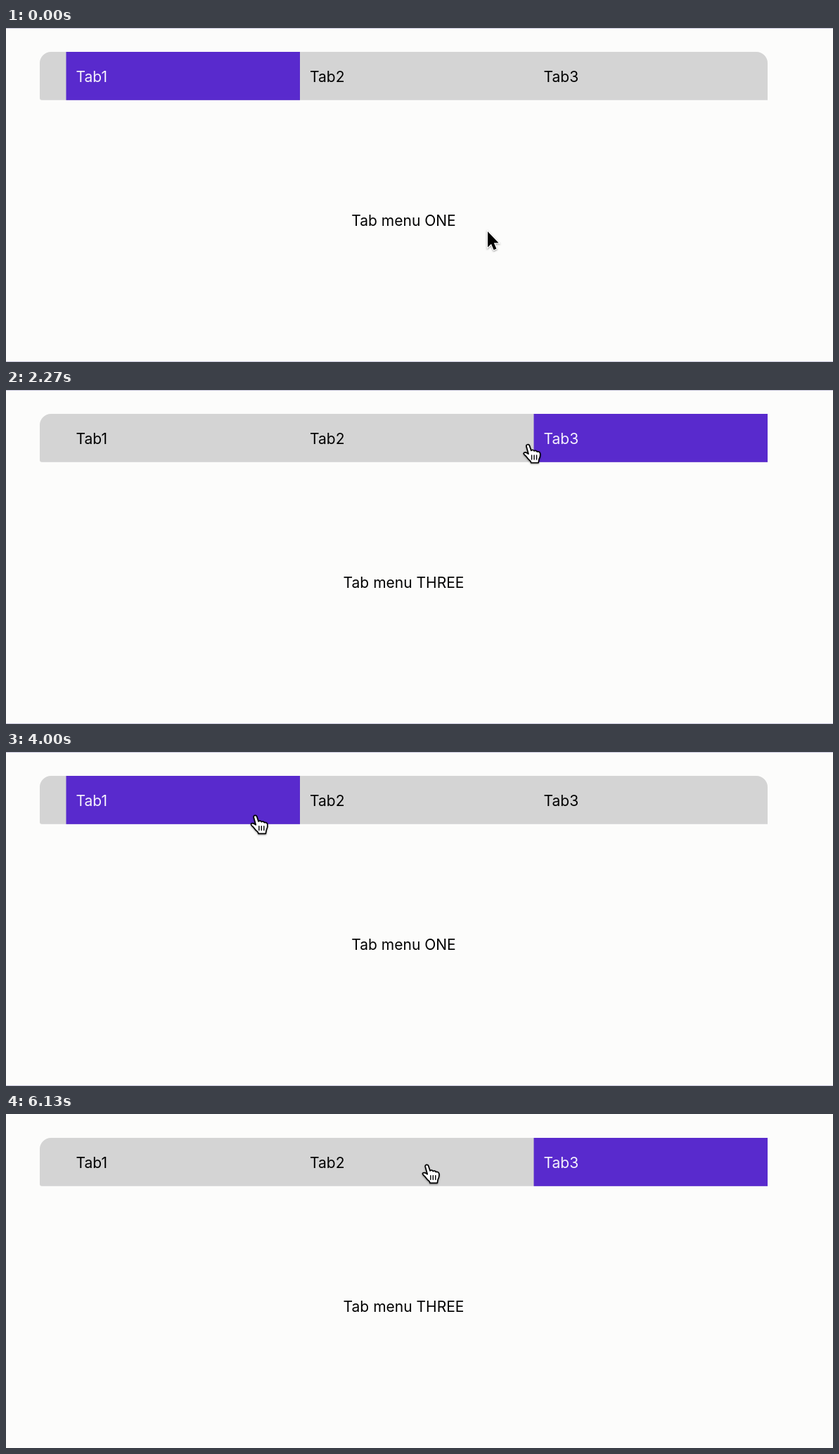
Write an HTML page that moves like this. It is 1176 by 476 pixels and loops after 6.16 s.

```html
<!DOCTYPE html>
<html lang="en">
<head>
<meta charset="utf-8">
<title>Tab menu</title>
<style>
html, body { margin: 0; width: 100%; height: 100%; overflow: hidden; background: #fcfcfb; }
svg { display: block; width: 100%; height: 100%; }
text { font: 21px Inter, "Open Sans", sans-serif; }
.cursor { filter: drop-shadow(0 1.5px 1.2px rgba(0, 0, 0, .4)); }
</style>
</head>
<body>
<svg viewBox="0 0 1176 476">
  <path id="edges" d="M0 .5H1176M0 475.5H1176" stroke="#c8c6da"/>
  <path d="M48 50a16 16 0 0 1 16-16H1067a16 16 0 0 1 16 16V102.8H51a3 3 0 0 1-3-3Z" fill="#d4d4d4"/>
  <rect id="active" y="34" width="332.5" height="68.8" fill="#592acd"/>
  <g id="labels">
    <text x="99.5" y="77">Tab1</text>
    <text x="432" y="77">Tab2</text>
    <text x="764.5" y="77">Tab3</text>
  </g>
  <text id="panel" x="565.5" y="282" text-anchor="middle"></text>
  <g id="cursor" class="cursor">
    <path id="arrow" d="M0 0V22.5L5 17.8L8.6 26.2L12.4 24.5L8.8 16.3H15.5Z" stroke="#fff" stroke-width="2.4" paint-order="stroke"/>
    <g id="hand" transform="translate(-7 -1)" stroke="#000" stroke-width="1.7" stroke-linejoin="round" stroke-linecap="round">
      <path fill="#fff" d="M5.2 4C4.6 1 8.8 .4 9.7 3L12 10C13.2 8.6 15.7 8.9 16.3 10.6C17.7 9.5 19.8 10 20.4 11.7C22 11 24.4 11.7 24.8 14C25.3 17 24.6 19.8 23.2 22.3L22.3 27.4H12L11.2 25.2C8.3 22.8 6.4 20.4 4.8 18.2C3.2 16.5 1 15.5 1.4 13.8C2 12 4.8 12.3 6.4 13.7L8.2 14.8Z"/>
      <path d="M12.8 16.6V22.6M16.3 16.6V22.6M19.8 16.6V22.6" stroke-width="1.4"/>
    </g>
  </g>
</svg>
<script>
const LOOP = 6160, TAB_X = 85.5, TAB_W = 332.5;
const FIRST_CLICK = 1540, LAST_CLICK = 5200, LAG = 140;
const $ = id => document.getElementById(id);
const words = ["ONE", "TWO", "THREE"];

// The pointer rests or turns at these points: time, x, y
const turns = [
  [0, 685, 290], [620, 533, 85], [1200, 527, 77], [FIRST_CLICK, 527, 77],
  [1830, 856, 75], [2060, 856, 75], [2730, 370, 85], [3300, 857, 73],
  [4000, 354, 90], [4360, 847, 67], [4670, 357, 79], [4870, 801, 55],
  [5300, 801, 55], [5830, 598, 72], [LOOP, 598, 72]
];

function pointerAt(t) {
  const i = turns.findIndex(turn => turn[0] > t);
  const [t0, x0, y0] = turns[i - 1], [t1, x1, y1] = turns[i];
  const p = (t - t0) / (t1 - t0), e = p * p * (3 - 2 * p);
  return [x0 + (x1 - x0) * e, y0 + (y1 - y0) * e];
}

// While clicking, the tab under the pointer opens a moment later
function tabAt(t) {
  if (t < FIRST_CLICK) return 0;
  const [x] = pointerAt(Math.min(t - LAG, LAST_CLICK));
  return Math.floor((x - TAB_X) / TAB_W);
}

function show(id, on) {
  $(id).style.display = on ? "" : "none";
}

function draw(t) {
  const tab = tabAt(t), [x, y] = pointerAt(t), over = y < 102;
  $("active").setAttribute("x", TAB_X + TAB_W * tab);
  [...$("labels").children].forEach((label, i) =>
    label.setAttribute("fill", i === tab ? "#f5f2fc" : "#000"));
  $("panel").textContent = "Tab menu " + words[tab];
  $("cursor").setAttribute("transform", `translate(${x} ${y})`);
  show("hand", over);
  show("arrow", !over);
  show("edges", t < 6000);
}

const start = performance.now();
function tick() {
  draw((performance.now() - start) % LOOP);
  requestAnimationFrame(tick);
}
tick();
</script>
</body>
</html>
```
